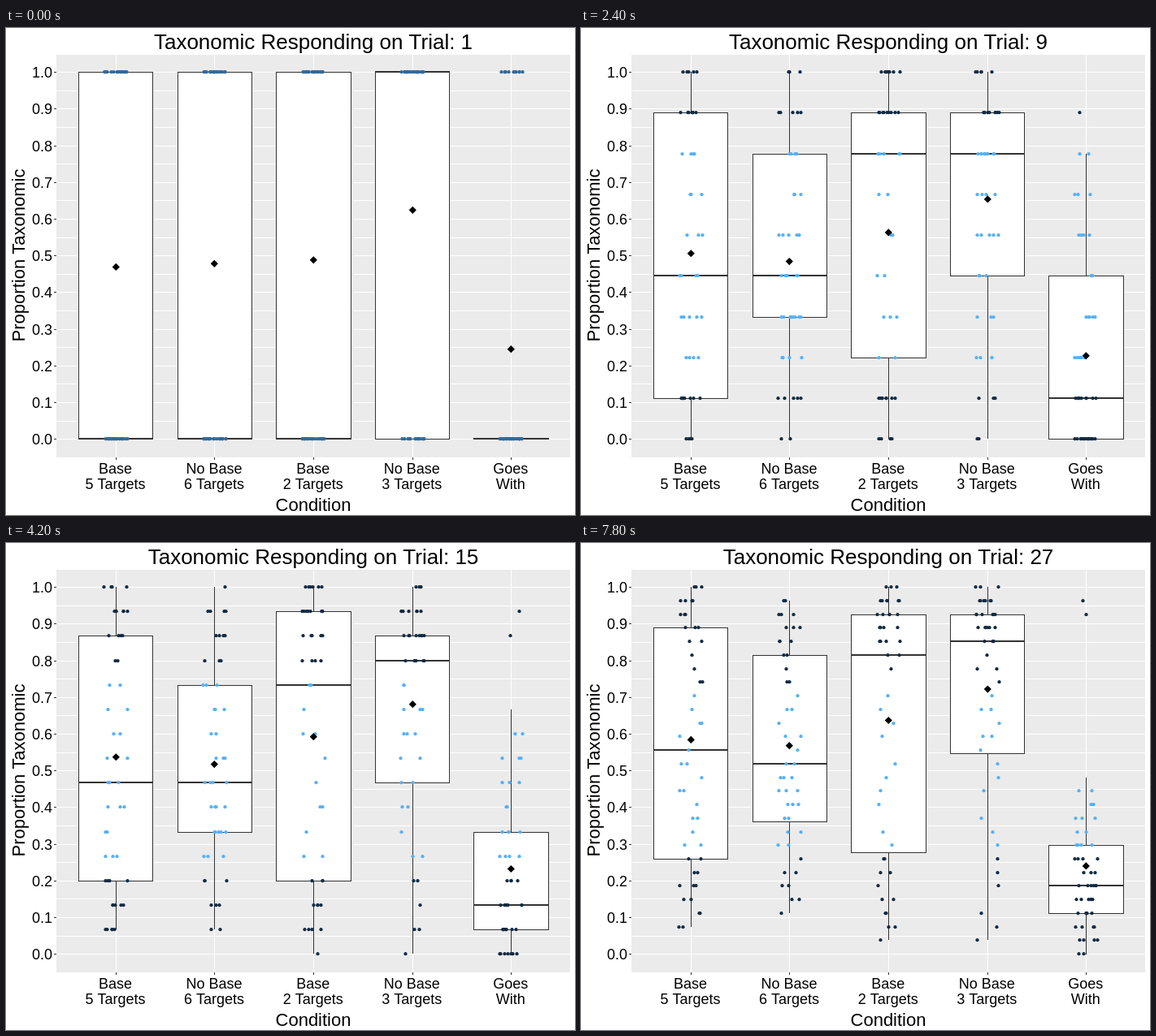
Recreate the animation shown at these times as an HTML page with a canvas. Size 700 px wide and 600 px high, loop 8000 ms.

```html
<!DOCTYPE html>
<html lang="en">
<head>
<meta charset="utf-8">
<title>Taxonomic Responding</title>
<style>
  html, body { margin: 0; width: 100%; height: 100%; overflow: hidden; background: #fff; }
  canvas { display: block; }
</style>
</head>
<body>
<canvas id="plot" width="700" height="600"></canvas>
<script>
const ctx = document.getElementById('plot').getContext('2d');
const STEP = 300, LOOP = 8000, EARLY = 7, LAST = 27;
const DARK = '#132b43', LIGHT = '#56b1f7', MID = '#336a98', LINE = '#333';

// mean: at the first, early and last trial.
// from, to: low, quartiles and high, as counts out of EARLY and LAST trials.
const groups = [
  { label: ['Base', '5 Targets'], size: 49, mean: [.469, .489, .584],
    from: [0, 1, 3, 6, 7], to: [2, 7, 15, 24, 27] },
  { label: ['No Base', '6 Targets'], size: 48, mean: [.478, .466, .568],
    from: [0, 2, 3, 5, 7], to: [3, 9.75, 14, 22, 26] },
  { label: ['Base', '2 Targets'], size: 47, mean: [.488, .547, .637],
    from: [0, 1, 5, 6.5, 7], to: [1, 7.5, 22, 25, 27] },
  { label: ['No Base', '3 Targets'], size: 48, mean: [.624, .639, .722],
    from: [0, 3, 5, 6, 7], to: [1, 14.75, 23, 25, 27] },
  { label: ['Goes', 'With'], size: 49, mean: [.245, .224, .24], strays: 2,
    from: [0, 0, 1, 3, 6], to: [0, 3, 5, 8, 13] },
];

const lerp = (a, b, f) => a + (b - a) * f;
const px = g => 134.85 + 121.55 * g;
const py = v => 506.2 - 452 * v;
const progress = trial => Math.max(0, (trial - EARLY) / (LAST - EARLY)) ** .75;

function rand(a, b, c) {
  const s = Math.sin(a * 12.9898 + b * 78.233 + c * 37.719) * 43758.5453;
  return s - Math.floor(s);
}

function meanAt({ mean: [first, early, last] }, trial) {
  return trial < EARLY
    ? lerp(first, early, (trial - 1) / (EARLY - 1))
    : lerp(early, last, progress(trial));
}

// Proportion at quantile p; the first trial can only be 0 or 1.
function quantile(group, p, trial) {
  if (trial === 1) return p >= 1 - group.mean[0] ? 1 : 0;
  const k = Math.min(3, Math.floor(4 * p)), f = progress(trial);
  const knot = i => lerp(group.from[i] / EARLY, group.to[i] / LAST, f);
  return lerp(knot(k), knot(k + 1), 4 * p - k);
}

const toCount = (v, trial) => Math.round(v * trial) / trial;

function boxStats(group, trial) {
  const exact = trial === EARLY || trial === LAST;
  const [lo, q1, med, q3, hi] = [0, .25, .5, .75, 1].map(p => {
    const v = quantile(group, p, trial);
    return exact ? v : toCount(v, trial);
  });
  return { lo, q1, med, q3, hi: Math.min(hi, q3 + 1.5 * (q3 - q1)) };
}

// Two-sided binomial test against chance.
function significant(count, n) {
  let term = 2 / 2 ** n, p = 0;
  for (let j = 0; j <= Math.min(count, n - count); j++) {
    p += term;
    term *= (n - j) / (j + 1);
  }
  return p < .05;
}

function dotColor(v, trial) {
  if (trial < 6) return MID;
  return significant(Math.round(v * trial), trial) ? DARK : LIGHT;
}

function rect(color, x, y, w, h) {
  ctx.fillStyle = color;
  ctx.fillRect(Math.round(x), Math.round(y), Math.round(w), Math.round(h));
}

function text(str, x, y, size, align = 'center') {
  ctx.fillStyle = '#000';
  ctx.font = size + 'px "Liberation Sans", Arial, sans-serif';
  ctx.textAlign = align;
  ctx.fillText(str, x, y);
}

function drawAxes(trial) {
  rect('#fff', 0, 0, 700, 600);
  rect('#ebebeb', 62, 33, 632, 496);
  for (let i = 0; i <= 20; i++) {
    const y = py(i / 20);
    rect('#fff', 62, y, 632, 1);
    if (i % 2) continue;
    rect(LINE, 59, y, 3, 1);
    text((i / 20).toFixed(1), 57, Math.round(y) + 7, 18, 'right');
  }
  groups.forEach(({ label }, g) => {
    rect('#fff', px(g), 33, 1, 496);
    rect(LINE, px(g), 529, 1, 3);
    label.forEach((s, i) => text(s, px(g) - .3, 549 + 19 * i, 18));
  });
  text('Taxonomic Responding on Trial: ' + trial, 378, 26, 26);
  text('Condition', 378, 595, 22);
  ctx.save();
  ctx.translate(23, 280);
  ctx.rotate(-Math.PI / 2);
  text('Proportion Taxonomic', 0, 0, 22);
  ctx.restore();
}

function drawBox(x, { lo, q1, med, q3, hi }) {
  const left = Math.round(x - 45.6), width = Math.round(x + 45.6) - left;
  const top = Math.round(py(q3)), height = Math.round(py(q1)) - top;
  rect(LINE, x, py(hi), 1, py(lo) - py(hi));
  rect(LINE, left, top, width + 1, height + 1);
  if (height > 1) rect('#fff', left + 1, top + 1, width - 1, height - 1);
  rect(LINE, left, Math.round(py(med)) - 1, width + 1, 2);
}

function drawDots(group, g, trial) {
  const { size, strays = 0 } = group;
  for (let i = 0; i < size; i++) {
    const rank = size - i;
    const stray = rank <= strays && trial > EARLY;
    const v = stray ? 1 - rank / trial : toCount(quantile(group, i / (size - 1), trial), trial);
    const x = px(g) + 29 * (rand(trial, g, i) - .5);
    ctx.fillStyle = dotColor(v, trial);
    ctx.beginPath();
    ctx.arc(Math.round(x) + .5, Math.round(py(v)) + .2, 2.1, 0, 7);
    ctx.fill();
  }
}

function drawDiamond(x, y, r) {
  ctx.fillStyle = '#000';
  ctx.beginPath();
  ctx.moveTo(x - r, y);
  ctx.lineTo(x, y - r);
  ctx.lineTo(x + r, y);
  ctx.lineTo(x, y + r);
  ctx.fill();
}

function draw(trial) {
  drawAxes(trial);
  groups.forEach((group, g) => {
    drawBox(px(g), boxStats(group, trial));
    drawDots(group, g, trial);
    drawDiamond(Math.round(px(g)) + .3, py(meanAt(group, trial)) + .2, 4.6);
  });
}

let shown = 0;
function frame() {
  const trial = 1 + Math.floor(performance.now() % LOOP / STEP);
  if (trial !== shown) draw(shown = trial);
  requestAnimationFrame(frame);
}
frame();
</script>
</body>
</html>
```
